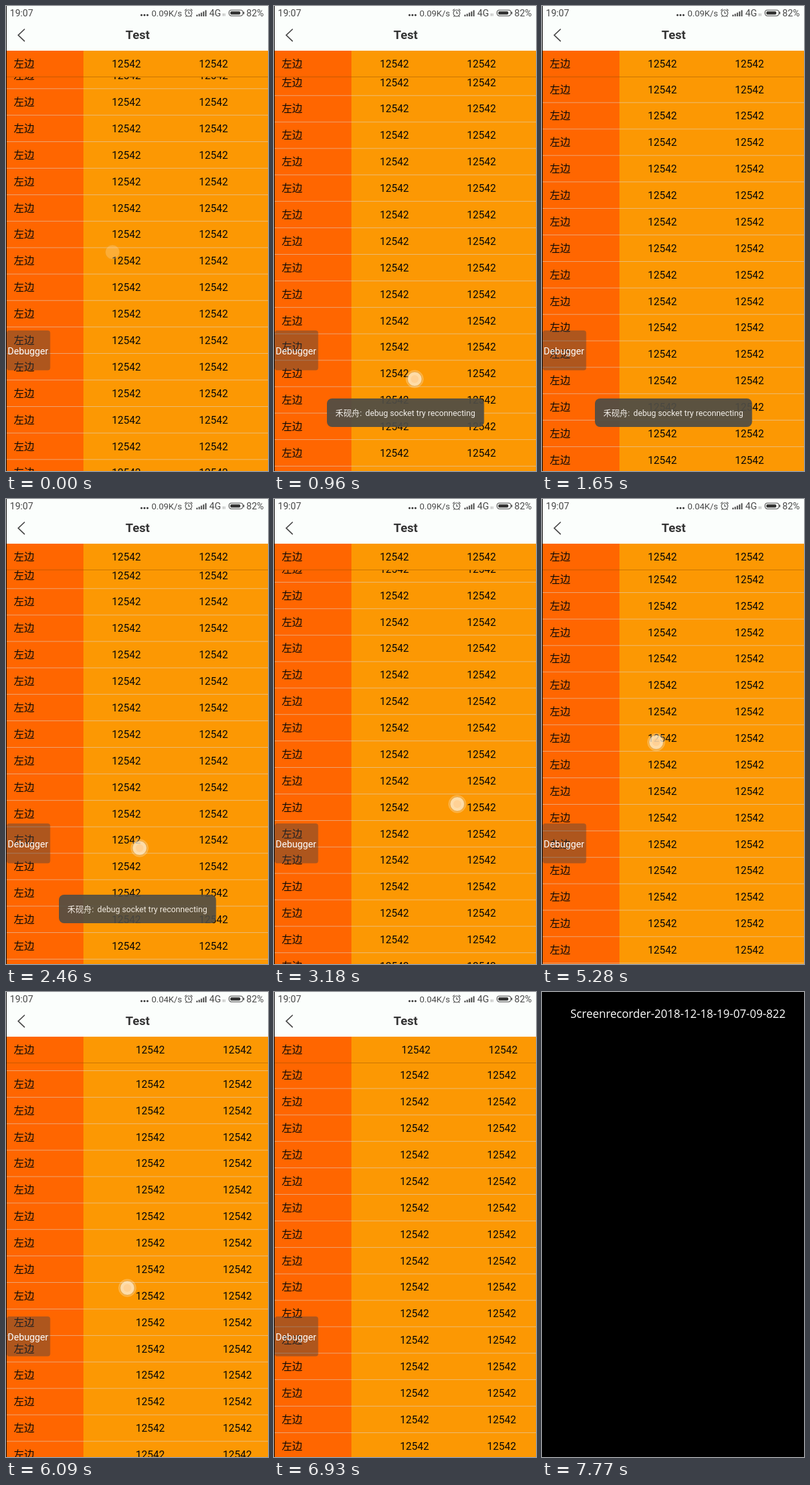
These frames come from a looping animation (406x718 px, 9300 ms). An HTML page:

```html
<!DOCTYPE html>
<html lang="zh">
<head>
<meta charset="utf-8">
<title>Test</title>
<style>
  html, body { margin: 0; width: 100%; height: 100%; overflow: hidden; background: #000; }
  svg { display: block; width: 100vw; height: 100vh; }
  text { font-family: Roboto, "Noto Sans CJK SC", "Noto Sans CJK", sans-serif; white-space: pre; }
  .cell { font-size: 16px; fill: #080808; }
  .status { font-size: 14.5px; fill: #484848; }
</style>
</head>
<body>
<svg viewBox="0 0 406 718">
  <defs>
    <clipPath id="listClip"><rect x="1" y="109.5" width="405" height="609"/></clipPath>
    <clipPath id="columnClip"><rect x="120" y="69" width="286" height="649"/></clipPath>
  </defs>
  <rect width="406" height="718"/>
  <g id="app">
    <rect x="1" width="405" height="69" fill="#fbfefc"/>
    <rect x="1" y="69" width="119" height="649" fill="#ff6600"/>
    <rect x="120" y="69" width="286" height="649" fill="#fc9803"/>

    <g clip-path="url(#listClip)">
      <g clip-path="url(#columnClip)"><g id="numbers"></g></g>
      <g id="rows"></g>
    </g>
    <g clip-path="url(#columnClip)"><g id="headNumbers"></g></g>
    <text class="cell" x="12" y="95.2">左边</text>
    <rect x="1" y="109" width="405" height="1" fill="#8a4a00" opacity=".45"/>

    <g class="status">
      <text class="status" x="6" y="16">19:07</text>
      <g fill="#333"><circle cx="210" cy="14" r="1.6"/><circle cx="214.6" cy="14" r="1.6"/><circle cx="219.2" cy="14" r="1.6"/></g>
      <text id="speed" class="status" x="225.5" y="16" style="font-size:13.5px"></text>
      <g fill="none" stroke="#484848" stroke-width="1.1">
        <circle cx="283" cy="11" r="5"/>
        <path d="M283 8v3.3h2.4M277 7.2l2.7-2.6M289 7.2l-2.7-2.6M279.6 15l-1.2 1.6M286.4 15l1.2 1.6"/>
      </g>
      <path d="M296 16v-2.5M299.4 16v-4M302.8 16v-5.7M306.2 16v-7.6M309.6 16v-9.6" stroke="#484848" stroke-width="2"/>
      <text class="status" x="315" y="16">4G</text>
      <path d="M336.5 11.5v4M339 11.5v4" stroke="#999" stroke-width="1"/>
      <rect x="345.6" y="6.2" width="21.5" height="9" rx="3.6" fill="none" stroke="#484848" stroke-width="1.1"/>
      <rect x="347.6" y="8.2" width="15.5" height="5" rx="1.8" fill="#333"/>
      <rect x="367.6" y="8.7" width="1.6" height="4" rx=".8" fill="#484848"/>
      <text class="status" x="372.5" y="16">82%</text>
    </g>
    <path d="M29 35.5L19 45l10 9.7" fill="none" stroke="#444" stroke-width="1.7"/>
    <text x="204" y="51.3" text-anchor="middle" font-size="19" font-weight="700" fill="#333">Test</text>

    <rect x="1" y="501" width="67.5" height="61.5" rx="4" fill="#3e4046" opacity=".42"/>
    <text x="2.5" y="538" font-size="14.7" fill="#fff">Debugger</text>

    <g id="toast">
      <rect x="82" y="606" width="243.5" height="44" rx="8" fill="#4f4d45" opacity=".93"/>
      <text y="633" font-size="12.7" fill="#f2eee8"><tspan x="95">禾砚舟: </tspan><tspan x="141.5">debug socket try reconnecting</tspan></text>
    </g>

    <g id="touch">
      <circle id="halo" r="13.5" fill="#fff" fill-opacity=".22" stroke="#fff" stroke-opacity=".16"/>
      <circle id="disc" r="11" fill="#fff3dc" stroke="#a87a38" stroke-opacity=".4"/>
      <circle id="spot" r="6" fill="#ffc582" opacity=".6"/>
    </g>
  </g>
  <text id="fileName" x="44" y="40" font-size="17.45" fill="#fff" style="font-family:'Open Sans','Noto Sans',sans-serif">Screenrecorder-2018-12-18-19-07-09-822</text>
</svg>
<script>
const LOOP = 9300, END = 7770, ROW = 40.88, ROWS = 18, LIST_TOP = 110;
const $ = id => document.getElementById(id);
const clamp = v => Math.max(0, Math.min(1, v));
const smooth = u => u * u * (3 - 2 * u);

function add(parent, tag, attrs, text = "") {
  const node = document.createElementNS("http://www.w3.org/2000/svg", tag);
  for (const key in attrs) node.setAttribute(key, attrs[key]);
  node.textContent = text;
  parent.append(node);
}
const move = (node, x, y) => node.setAttribute("transform", `translate(${x} ${y})`);
const fade = (node, value) => node.setAttribute("opacity", value);

// Value of a [time, value] track, eased between its points.
function track(points, t, column = 1, ease = smooth) {
  const next = points.findIndex(p => p[0] > t);
  if (next === 0) return points[0][column];
  if (next < 0) return points[points.length - 1][column];
  const a = points[next - 1], b = points[next];
  return a[column] + (b[column] - a[column]) * ease((t - a[0]) / (b[0] - a[0]));
}

const beats = [0, 150, 960, 1110, 1260, 2190, 2340, 2460, 2610, 3180, 3300, 3450,
  4470, 4620, 5550, 5670, 6090, 6210, 6630, 6780, 7500, END];
function stepTime(t) {
  const i = beats.findIndex(b => b > t) - 1;
  const span = beats[i + 1] - beats[i];
  const step = span / Math.round(span / 136);
  return beats[i] + Math.floor((t - beats[i]) / step) * step;
}

const rowLine = (phase, count) => phase - ROW * count;
const scrollY = [[0, 127.8], [880, rowLine(138.2, 8)], [1000, rowLine(138.2, 8)],
  [2300, rowLine(138.2, 24)], [2480, rowLine(138.2, 24)], [3100, rowLine(128.4, 30)],
  [4950, rowLine(128.4, 30)], [5700, rowLine(121.5, 22)], [6210, rowLine(121.5, 22)],
  [6630, rowLine(149, 22)]];
const scrollX = [[3200, 0], [3845, -104], [5095, 0], [5650, 0], [6000, 37], [6750, 37], [7450, 0]];
const toastDrop = [[560, 40], [800, 0], [2370, 0], [2460, 5], [2700, 40]];
const toastAlpha = [[560, 0], [800, 1], [2430, 1], [2720, 0]];
const touches = [
  [[0, 165, 380], [420, 172, 225]],
  [[800, 219, 580], [960, 218, 576], [1400, 235, 330]],
  [[2300, 206, 538], [2460, 207, 539], [2800, 230, 300]],
  [[3020, 286, 471], [3180, 284, 471], [3800, 185, 465]],
  [[5000, 180, 330], [5400, 172, 450]],
  [[5680, 150, 455], [6090, 188, 457], [6700, 190, 484]]
];

for (let i = 0; i < 3; i++) {
  const x = 164 + 135 * i;
  add($("headNumbers"), "text", { class: "cell", x, y: 95.2 }, "12542");
  for (let r = 0; r < ROWS; r++)
    add($("numbers"), "text", { class: "cell", x, y: r * ROW + 26.3 }, "12542");
}
for (let r = 0; r < ROWS; r++) {
  add($("rows"), "rect", { x: 1, y: r * ROW - 0.35, width: 405, height: 0.7, fill: "#ddd", opacity: 0.75 });
  add($("rows"), "text", { class: "cell", x: 12, y: r * ROW + 26.3 }, "左边");
}

function drawTouch(t) {
  const path = touches.find(p => t >= p[0][0] && t < p[p.length - 1][0] + 100);
  $("touch").style.display = path ? "" : "none";
  if (!path) return;
  const linear = u => u;
  move($("touch"), track(path, t, 1, linear), track(path, t, 2, linear));
  const press = clamp((t - path[0][0] + 50) / 150) * clamp((path[path.length - 1][0] + 100 - t) / 100);
  fade($("disc"), 0.68 * press);
  fade($("halo"), press ** 3);
  fade($("spot"), 0.5 * press ** 3);
}

function draw(now) {
  const time = now % LOOP, playing = time < END;
  $("app").style.display = playing ? "" : "none";
  $("fileName").style.display = playing ? "none" : "";
  if (!playing) return;

  const t = stepTime(time);
  const y = track(scrollY, t) - LIST_TOP;
  const top = LIST_TOP - ROW + ((y % ROW) + ROW) % ROW;
  const x = track(scrollX, t);
  move($("numbers"), x, top);
  move($("rows"), 0, top);
  // The sticky row follows the list with a short lag.
  move($("headNumbers"), track(scrollX, t - 40), 0);
  $("speed").textContent = t < 3900 ? "0.09K/s" : "0.04K/s";
  move($("toast"), 0, track(toastDrop, t));
  fade($("toast"), track(toastAlpha, t));
  drawTouch(t);
}

const start = performance.now();
function tick() {
  draw(performance.now() - start);
  requestAnimationFrame(tick);
}
tick();
</script>
</body>
</html>
```
